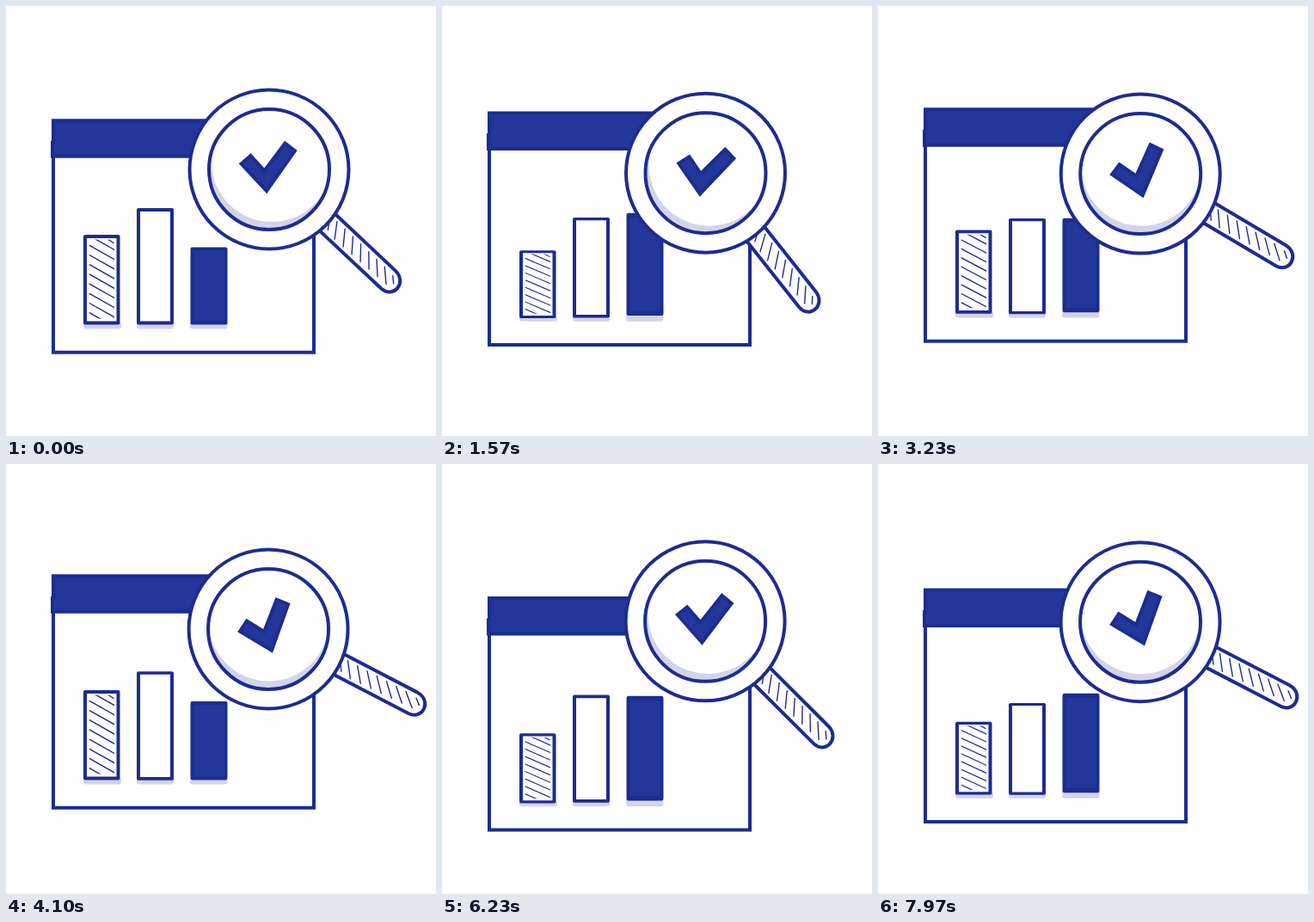
These frames come from a looping animation (500 by 500 pixels, 8000 ms). An HTML page:

```html
<!DOCTYPE html>
<html lang="en">
<head>
<meta charset="utf-8">
<title>Chart review</title>
<style>
  html, body { margin: 0; width: 100%; height: 100%; overflow: hidden; background: #fff; }
  svg { display: block; width: 100%; height: 100%; }
  .line { fill: none; stroke: #1c2d8f; stroke-width: 4; stroke-linejoin: round; stroke-linecap: round; }
  .sharp { stroke-linejoin: miter; }
  .paper { fill: #fff; }
  .ink { fill: #23379b; }
  .shade { fill: #d2d4ea; }
  .hatch { stroke: #1c2d8f; stroke-width: 1.4; stroke-linecap: round; fill: none; }
</style>
</head>
<body>
<svg viewBox="0 0 500 500">
  <defs>
    <clipPath id="barClip"><rect x="96.5" y="-104" width="29.5" height="92"/></clipPath>
    <clipPath id="lensClip"><circle r="70"/></clipPath>
  </defs>

  <g id="panel">
    <path class="line sharp" d="M55 2V270H358V60"/>
    <path class="line sharp ink" d="M55 .5H335V42H54V26H55Z"/>
    <g id="bar0">
      <rect class="shade" x="90" y="-8" width="44" height="8" rx="3"/>
      <rect class="line paper" x="92" y="-107.5" width="38.5" height="100.5"/>
      <path class="hatch" id="barHatch" clip-path="url(#barClip)"/>
    </g>
    <g id="bar1">
      <rect class="shade" x="152" y="-8" width="43" height="8" rx="3"/>
      <rect class="line paper" x="154" y="-138.5" width="39" height="131.5"/>
    </g>
    <g id="bar2">
      <rect class="shade" x="214" y="-8" width="43.5" height="8" rx="3"/>
      <rect class="line ink" x="216.5" y="-93" width="39" height="86"/>
    </g>
  </g>

  <g id="glass">
    <g id="handle">
      <path class="line paper" d="M86 -13.5L188 -12C208 -11 208 14 190 14.5L86 13Z"/>
      <path class="hatch" id="gripHatch"/>
    </g>
    <circle class="line paper" r="92.5"/>
    <g id="face">
      <g clip-path="url(#lensClip)">
        <circle class="shade" r="70"/>
        <circle class="paper" cx="3" cy="-9" r="70"/>
      </g>
      <path class="line sharp ink" d="M-32.5 -6.5L-21.5 -16L-5.5 1.5L18.5 -30.5L30 -21.5L-3 25Z"/>
    </g>
    <circle class="line" r="70"/>
  </g>
</svg>
<script>
const LOOP = 8000;
const CYCLE = 10000;  // full period of the motion; the loop cuts it short
const REST_ANGLE = 42.4;
const el = id => document.getElementById(id);

// Sine-eased swing from rest to a, b, a, ... at the given turn times, back to rest at CYCLE.
// hold is the share of each move towards a that is spent waiting at its end.
function swing(rest, a, b, turns, hold = 0) {
  const times = [0, ...turns, CYCLE];
  const value = i => i === 0 || i === times.length - 1 ? rest : i % 2 ? a : b;
  return t => {
    const i = times.findIndex(x => x > t) - 1;
    const span = (times[i + 1] - times[i]) * (i % 2 ? 1 : 1 - hold);
    const u = Math.min(1, (t - times[i]) / span);
    return value(i) + (value(i + 1) - value(i)) * (1 - Math.cos(Math.PI * u)) / 2;
  };
}

const panelY = swing(132.8, 118.2, 155.6, [2780, 6300]);
const glassY = swing(190, 196, 181.8, [2500, 7000]);
const angle = swing(REST_ANGLE, 51, 23.7, [2080, 3760, 5640, 7400], .15);
const bars = [
  swing(1, .743, 1, [1800, 4000, 6900]),
  swing(1, .788, 1, [2600, 5000, 8000]),
  swing(1, 1.403, 1, [2200, 4380, 6780])
];

function stroke(x, y, dx, dy) {
  return `M${x - dx} ${y - dy}L${x + dx} ${y + dy}`;
}

let barLines = stroke(122, -102, 3, 2);
for (let k = -1; k < 8; k++) barLines += stroke(111.5, -89 + 11.2 * k, 14.5, 8.2);
el('barHatch').setAttribute('d', barLines);

let gripLines = stroke(96, 3, 2, 3) + stroke(193, -2.5, 3.4, 3);
for (let k = 0; k < 7; k++) gripLines += stroke(105 + 13 * k, 0, 6 + .25 * k, 8.7 - .3 * k);
el('gripHatch').setAttribute('d', gripLines);

function place(id, transform) {
  el(id).setAttribute('transform', transform);
}

function draw(t) {
  const turn = angle(t);
  place('panel', `translate(0 ${panelY(t)})`);
  bars.forEach((scale, i) => place('bar' + i, `translate(0 242.7) scale(1 ${scale(t)})`));
  place('glass', `translate(${306 + (turn - REST_ANGLE) * .06} ${glassY(t)})`);
  place('handle', `rotate(${turn})`);
  place('face', `rotate(${turn - REST_ANGLE})`);
}

const start = performance.now();
function tick() {
  draw((performance.now() - start) % LOOP);
  requestAnimationFrame(tick);
}
tick();
</script>
</body>
</html>
```
